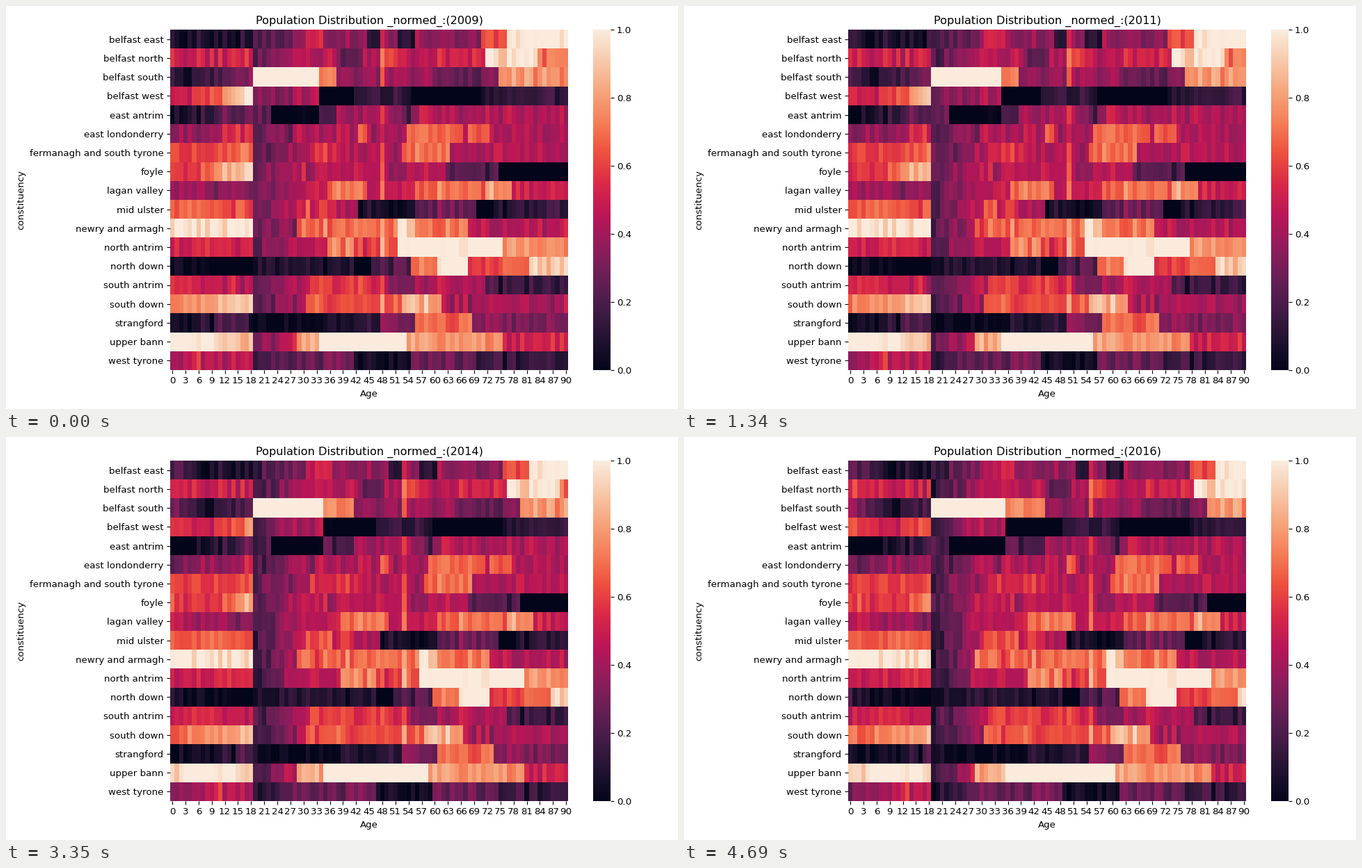
Recreate the animation shown at these times as a matplotlib script. Size 966x580 px, loop 7.37 s.

```python
import numpy as np
import matplotlib.pyplot as plt
from matplotlib.animation import FuncAnimation
from matplotlib.colors import LinearSegmentedColormap

WIDTH, HEIGHT, DPI = 966, 580, 100
FIRST_YEAR, SPAN, FRAMES, INTERVAL = 2009, 7, 11, 670
AGES = np.arange(91)
ADULT, BABY_BOOM = 19, 48

ROCKET = LinearSegmentedColormap.from_list("rocket", [
    "#03051a", "#221331", "#451c47", "#691f55", "#921c5b", "#b91657",
    "#d92847", "#ed503e", "#f47d57", "#f6a47c", "#f7c9aa", "#faebdd"])

# The text is set a little below the default size.
SCALE = .966
plt.rcParams.update({"font.size": 10 * SCALE,
                     "xtick.major.size": 3.5 * SCALE, "ytick.major.size": 3.5 * SCALE,
                     "xtick.major.pad": 3.5 * SCALE, "ytick.major.pad": 3.5 * SCALE})

rows = {}


def row(name, young, base, *bands):
    """Levels of children (unborn, toddler, 18), of adults, and (from, to, level) bands."""
    rows[name] = young, base, bands


row("belfast east", (.3, .03, .07), .36,
    (31, 35, .52), (45, 48, .14), (52, 56, .12), (71, 77, .62), (77, 91, 1))
row("belfast north", (.55, .46, .56), .44,
    (39, 44, .23), (48, 54, .54), (61, 72, .53), (72, 84, 1), (84, 91, .72))
row("belfast south", (.38, .05, .35), .36,
    (19, 34, 1.15), (34, 38, .76), (48, 53, .5), (60, 72, .23), (75, 91, .8))
row("belfast west", (.6, .48, .98), .42,
    (34, 42, -.15), (42, 55, .13), (55, 71, -.15), (71, 91, .12))
row("east antrim", (-.1, .07, .28), .43, (23, 34, -.05), (34, 38, .22), (52, 56, .26))
row("east londonderry", (.3, .33, .58), .42, (43, 45, .62), (54, 67, .67), (68, 73, .62))
row("fermanagh and south tyrone", (.62, .6, .64), .44, (32, 39, .56), (53, 64, .68))
row("foyle", (.6, .55, .92), .47, (50, 54, .36), (63, 75, .2), (75, 91, -.15))
row("lagan valley", (.48, .42, .36), .48, (36, 45, .72), (56, 72, .68), (72, 78, .78))
row("mid ulster", (.64, .66, .63), .45,
    (31, 38, .58), (43, 56, .06), (56, 70, .26), (70, 75, -.02), (75, 91, .14))
row("newry and armagh", (1.04, .97, 1.03), .44, (29, 52, .7), (52, 56, .95), (56, 68, .7))
row("north antrim", (.48, .52, .56), .46,
    (36, 42, .75), (42, 52, .6), (52, 76, 1.04), (76, 91, .77))
row("north down", (.12, .05, -.1), .1,
    (42, 46, -.08), (46, 55, .2), (55, 61, .7), (61, 68, 1.04), (68, 82, .62), (82, 91, .88))
row("south antrim", (.46, .55, .44), .44, (32, 46, .58), (50, 56, .3), (72, 91, .16))
row("south down", (.68, .72, .95), .42, (31, 53, .63), (53, 62, .83))
row("strangford", (.03, .05, .2), .32, (19, 36, .02), (36, 48, .12), (56, 69, .68))
row("upper bann", (.92, 1.05, .86), .52, (29, 34, .82), (34, 54, 1.15), (54, 76, .79))
row("west tyrone", (.28, .42, .52), .28, (42, 55, .04), (70, 91, .14))

cohort_noise = np.random.default_rng(9).normal(0, .05, (len(rows), len(AGES) + SPAN))


def profile(young, base, bands, step):
    """Children and older adults age with their cohort; young adults stay in place."""
    children = np.interp(AGES - step, (-SPAN, 3, 18), young)
    student_dip = np.interp(AGES, (ADULT, 30), (.55 - .25 * step / SPAN, 1))
    adults = base * student_dip
    cohort = AGES - step * np.clip((AGES - 33) / 12, 0, 1)
    for start, stop, level in bands:
        adults[(cohort >= start) & (cohort < stop)] = level
    return np.where(AGES < ADULT, children, adults)


def heat(step):
    levels = np.array([profile(*shape, step) for shape in rows.values()])
    boom = levels[:, BABY_BOOM + step]
    boom += .18 * (boom > .3)
    return np.clip(levels + cohort_noise[:, AGES - step + SPAN], 0, 1)


def place(left, top, width, height):
    axes = fig.add_axes([left / WIDTH, 1 - (top + height) / HEIGHT,
                         width / WIDTH, height / HEIGHT])
    axes.spines[:].set_visible(False)
    return axes


fig = plt.figure(figsize=(WIDTH / DPI, HEIGHT / DPI), dpi=DPI, facecolor="white")
ax = place(236, 34, 572.3, 490)
mesh = ax.pcolormesh(heat(0), cmap=ROCKET, vmin=0, vmax=1)
ax.invert_yaxis()
ax.set_xticks(AGES[::3] + .5, AGES[::3])
ax.set_yticks(np.arange(len(rows)) + .5, list(rows))
ax.set_xlabel("Age")
ax.set_ylabel("constituency")
title = ax.set_title("")

bar = fig.colorbar(mesh, cax=place(844, 34, 24.5, 490), ticks=np.linspace(0, 1, 6))
bar.outline.set_visible(False)


def update(frame):
    step = min(frame, SPAN)
    mesh.set_array(heat(step))
    title.set_text(f"Population Distribution _normed_:({FIRST_YEAR + step})")
    return mesh, title


animation = FuncAnimation(fig, update, frames=FRAMES, interval=INTERVAL,
                          repeat=True, repeat_delay=0)
plt.show()
```
